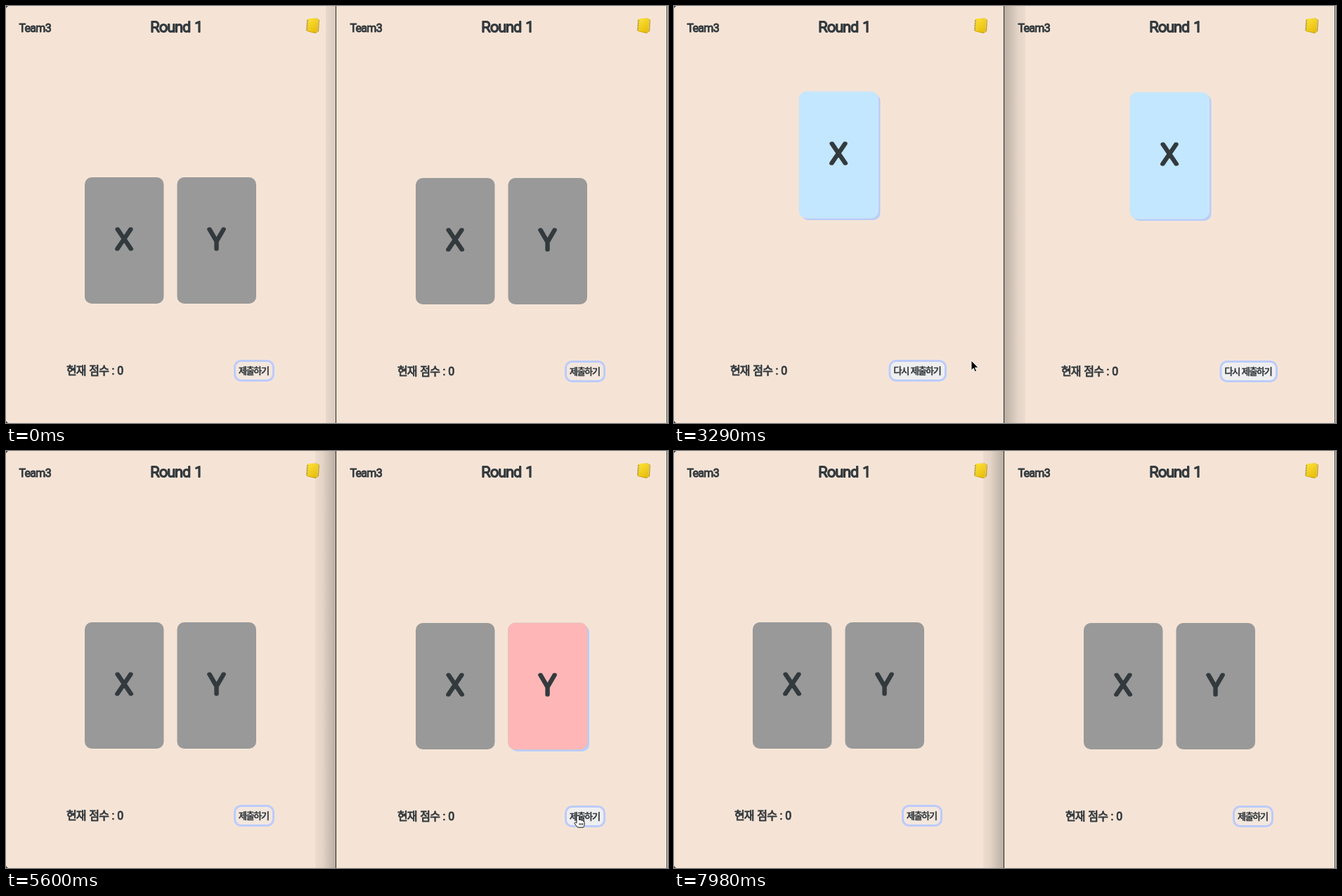
Write an HTML page that moves like this. It is 942 by 594 pixels and loops after 8.68 s.

```html
<!DOCTYPE html>
<html lang="ko">
<head>
<meta charset="utf-8">
<title>Round 1</title>
<style>
  html, body { margin: 0; height: 100%; overflow: hidden; background: #f5e4d6; }
  svg { display: block; width: 942px; height: 594px; }
  text {
    font-family: Roboto, "Noto Sans CJK KR", sans-serif;
    fill: #333a3e; stroke: #333a3e; stroke-linejoin: round;
  }
  .title { font-size: 21px; font-weight: 300; letter-spacing: -.6px; word-spacing: 1.5px; stroke-width: 2px; }
  .team { font-size: 16px; letter-spacing: -.7px; stroke-width: 1px; }
  .score { font-size: 16px; letter-spacing: -.9px; word-spacing: 1.6px; stroke-width: .9px; }
  .label { font-size: 13px; letter-spacing: -1.3px; word-spacing: 1px; stroke-width: .7px; }
  .letter { font-size: 38px; font-weight: 100; stroke-width: 5.4px; text-anchor: middle; }
  .button { fill: #efefef4d; stroke: #bccbfb; stroke-width: 3px; }
  .face { fill: #999; }
  .edge { fill: #b9cdfb; visibility: hidden; }
  .sent { display: none; }

  .pick-x .button, .pick-y .button, .sent .button { fill: #efefef; }
  .pick-x .x .edge, .sent-x .x .edge,
  .pick-y .y .edge, .sent-y .y .edge { visibility: visible; }
  .pick-x .x .face, .sent-x .x .face { fill: #c3e7ff; stroke: #d0e5f2; }
  .pick-y .y .face, .sent-y .y .face { fill: #ffb6b6; stroke: #e5bfbb; }
  .sent-x .idle, .sent-y .idle, .sent-x .y, .sent-y .x { display: none; }
  .sent-x .sent, .sent-y .sent { display: inline; }
</style>
</head>
<body>
<svg viewBox="0 0 942 594">
  <defs>
    <linearGradient id="shade">
      <stop offset="0" stop-opacity=".035"/>
      <stop offset=".35" stop-opacity=".07"/>
      <stop offset="1" stop-opacity=".24"/>
    </linearGradient>
    <linearGradient id="faint">
      <stop offset="0" stop-opacity=".05"/>
      <stop offset="1" stop-opacity=".11"/>
    </linearGradient>
    <linearGradient id="cover" x2=".6" y2="1">
      <stop offset="0" stop-color="#fde33e"/>
      <stop offset="1" stop-color="#e9c00c"/>
    </linearGradient>
  </defs>
  <rect width="942" height="594" fill="#f5e4d6"/>
  <path d="M0 0h3L0 3zM0 594h3L0 591z" fill="#444"/>
  <rect id="faintShade" x="455" width="14" height="594" fill="url(#faint)"/>
  <rect id="leftShade" x="440" width="29" height="594" fill="url(#shade)"/>
  <rect id="rightShade" x="-500" width="30" height="594" fill="url(#shade)" transform="scale(-1 1)"/>
  <path d="M469.5 0V594M940.5 0V594" stroke="#2b2725"/>
  <path d="M941.5 0V594" stroke="#f3efec"/>
  <g id="panels"></g>
  <circle id="ring" r="29.5" fill="none" stroke="#222" stroke-width="2" stroke-opacity=".8"/>
  <path id="arrow" d="M0 0V14l3.2-3 2.2 5 2.2-1-2.2-4.8H10Z" fill="#000" stroke="#fff" stroke-width=".9"/>
  <path id="hand" d="M-2 1.5a1.8 1.8 0 0 1 3.6 0V6q2.2-1 3 .7 2-.6 2.6 1 2-.2 1.8 2V13q-.2 2-1.5 3.6H-.5Q-2.5 14-5 11.2-5.4 8.6-2 10.5Z
    M2 10.5v3M4.2 10.5v3M6.4 10.5v3" fill="#fff" stroke="#111" stroke-width="1"/>
</svg>
<script>
const LOOP = 8680, FRAME = 70, LAST_FRAME = 7980;
const LIFT = 122, LIFT_TIME = 930;
const $ = id => document.getElementById(id);

const card = (name, letter) => `
  <g class="card ${name}">
    <rect class="edge" x="3" y="3" width="112.5" height="180" rx="10"/>
    <rect class="face" width="112.5" height="180" rx="10"/>
    <text class="letter" x="56" y="102.3">${letter}</text>
  </g>`;

const footer = (state, scoreX, buttonX, width, label) => `
  <g class="${state}">
    <text class="score" x="${scoreX}" y="525">현재 점수 : 0</text>
    <rect class="button" x="${buttonX}" y="505.5" width="${width}" height="28" rx="9"/>
    <text class="label" x="${buttonX + 5.5}" y="523.5">${label}</text>
  </g>`;

const notebook = `
  <path d="M429 18.5 442 17.5 446 20 445 36 440.5 39 428 36Z" fill="#c89d10"/>
  <path d="M429 18 442 17.5 444 19 442 38 428 35.5Z" fill="url(#cover)"/>
  <path d="M429 20 427.8 35" stroke="#8f7a32" stroke-width="2" stroke-dasharray="1 1.4"/>
  <path d="M444.5 20 442.8 37" stroke="#f6ecc0" stroke-width=".7"/>`;

const panel = x => `
  <g class="panel" transform="translate(${x})">
    <text class="team" x="18.5" y="36.5">Team3</text>
    <text class="title" x="205.5" y="36.6">Round 1</text>
    ${notebook}
    <g transform="translate(0 ${x ? 1 : 0})">
      ${card('x', 'X')}${card('y', 'Y')}
      ${footer('idle', 86, 325.5, 55, '제출하기')}
      ${footer('sent', 80, 307, 79.5, '다시 제출하기')}
    </g>
  </g>`;

$('panels').innerHTML = panel(0) + panel(471);
const panels = [...document.querySelectorAll('.panel')];

// start time, left state, right state
const phases = [
  [0, '', ''], [1120, 'pick-x', ''], [2240, 'sent-x', 'sent-x'], [4130, '', ''],
  [5110, '', 'pick-y'], [5950, 'sent-y', 'sent-y'], [7560, '', '']
];
const liftStart = { 'sent-x': [2165, 2172], 'sent-y': [5881, 5881] };
const presses = [[840, 1120], [2030, 2240], [3850, 4130], [5040, 5110], [5810, 5950], [7420, 7560]];

// time, x, y of the pointer tip
const path = [
  [350, 348, 539], [420, 245, 476], [490, 245, 476], [770, 203, 347.5], [1400, 203, 347.5],
  [1890, 344, 525], [1960, 343, 520], [3080, 343, 520], [3290, 423, 505], [3710, 798, 523],
  [4130, 800, 523.5], [4410, 810, 523], [4760, 810, 523], [5040, 784, 365], [5180, 784, 365],
  [5600, 814, 519.5], [7700, 814, 519.5], [7910, 654, 570]
];

// cubic-bezier(.25, .1, .25, 1)
function ease(p) {
  if (p <= 0 || p >= 1) return p <= 0 ? 0 : 1;
  const curve = (u, a, b) => 3 * u * (1 - u) ** 2 * a + 3 * u * u * (1 - u) * b + u ** 3;
  let low = 0, high = 1;
  for (let i = 0; i < 24; i++) {
    const mid = (low + high) / 2;
    if (curve(mid, .25, .25) < p) low = mid; else high = mid;
  }
  return curve(low, .1, 1);
}

function pointerAt(t) {
  const i = path.findIndex(point => point[0] >= t);
  if (i < 0 || t < path[0][0]) return null;
  const [t1, x1, y1] = path[i], [t0, x0, y0] = path[Math.max(i - 1, 0)];
  const p = t1 > t0 ? (t - t0) / (t1 - t0) : 1;
  return [x0 + (x1 - x0) * p, y0 + (y1 - y0) * p];
}

const show = (id, on) => $(id).style.display = on ? '' : 'none';

function drawPanel(t, state, side) {
  const root = panels[side], starts = liftStart[state];
  root.setAttribute('class', 'panel ' + state);
  const y = 244 - (starts ? LIFT * ease((t - starts[side]) / LIFT_TIME) : 0);
  root.querySelectorAll('.card').forEach((el, i) => {
    const x = starts ? 178 : 112 + 131.5 * i;
    el.setAttribute('transform', `translate(${x} ${Math.round(y)})`);
  });
}

function drawPointer(t) {
  const at = pointerAt(t);
  const overButton = at && at[1] > 504 && at[1] < 536 &&
    [324, 795].some(x => at[0] >= x && at[0] <= x + 58);
  show('arrow', at && !overButton);
  show('hand', overButton);
  show('ring', at && presses.some(([from, to]) => t >= from && t < to));
  if (at) for (const id of ['arrow', 'hand', 'ring'])
    $(id).setAttribute('transform', `translate(${at})`);
}

function draw(t) {
  const [, ...states] = phases.filter(phase => t >= phase[0]).pop();
  states.forEach((state, side) => drawPanel(t, state, side));
  show('faintShade', t < 840);
  show('rightShade', t >= 840 && t < 3850);
  show('leftShade', t >= 3850);
  drawPointer(t);
}

function tick() {
  const t = Math.floor(performance.now() % LOOP / FRAME) * FRAME;
  draw(Math.min(t, LAST_FRAME));
  requestAnimationFrame(tick);
}
tick();
</script>
</body>
</html>
```
